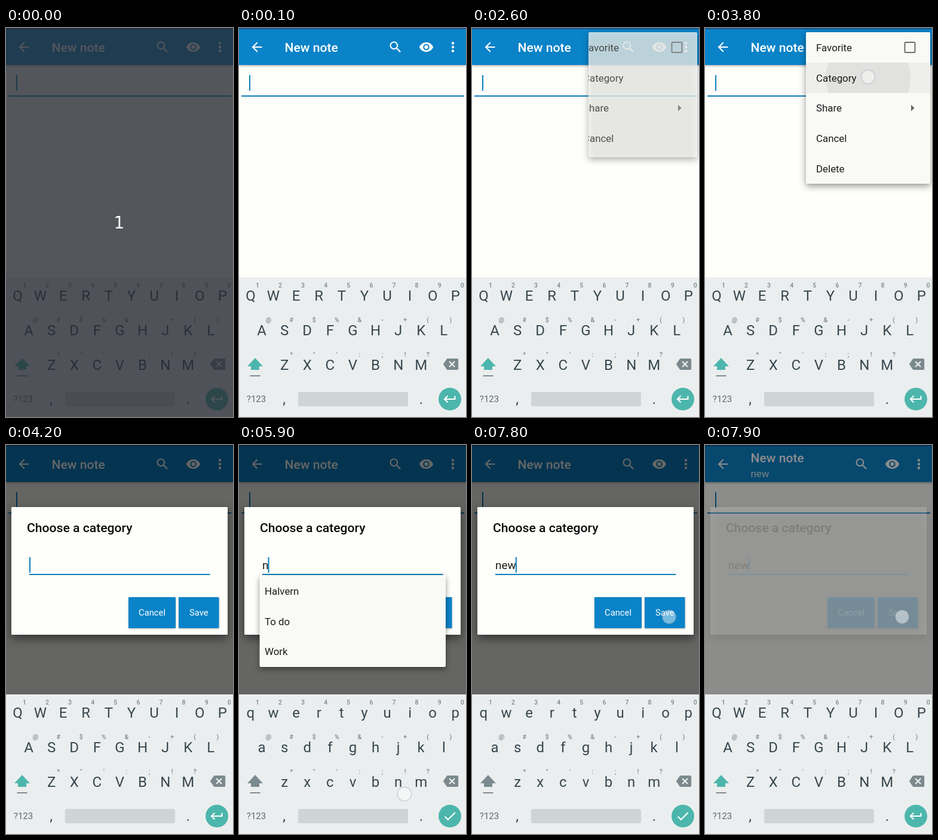
Recreate the animation shown at these times as an HTML page with a canvas. Size 380 by 652 pixels, loop 8 s.

```html
<!DOCTYPE html>
<html lang="en">
<head>
<meta charset="utf-8">
<title>New note</title>
<style>
  html, body { margin: 0; width: 100%; height: 100%; overflow: hidden; }
  canvas { display: block; width: 380px; height: 652px; }
</style>
</head>
<body>
<canvas id="stage" width="380" height="652"></canvas>
<script>
const ctx = document.getElementById('stage').getContext('2d');
const LOOP = 8000, STEP = 100, DP = 380 / 360;
const BLUE = '#0a83c8', LINE = '#0b80bb', PAPER = '#fefefb', CARD = '#f9faf6';
const KEY = '#37474f', HINT = '#7a878c', TEAL = '#4db6ac', PLATE = '#cfd5d4';

const ICONS = {
  back: 'M20 11H7.83l5.59-5.59L12 4l-8 8 8 8 1.41-1.41L7.83 13H20z',
  search: 'M15.5 14h-.79l-.28-.27C15.41 12.59 16 11.11 16 9.5 16 5.91 13.09 3 9.5 3S3 5.91 3 9.5 5.91 16 9.5 16c1.61 0 3.09-.59 4.23-1.57l.27.28v.79l5 4.99L20.49 19zm-6 0C7.01 14 5 11.99 5 9.5S7.01 5 9.5 5 14 7.01 14 9.5 11.99 14 9.5 14z',
  eye: 'M12 4.5C7 4.5 2.73 7.61 1 12c1.73 4.39 6 7.5 11 7.5s9.27-3.11 11-7.5c-1.73-4.39-6-7.5-11-7.5zM7 12a5 5 0 0 1 10 0a5 5 0 0 1-10 0zM9 12a3 3 0 0 1 6 0a3 3 0 0 1-6 0z',
  erase: 'M22 3H7c-.69 0-1.23.35-1.59.88L0 12l5.41 8.11c.36.53.9.89 1.59.89h15c1.1 0 2-.9 2-2V5c0-1.1-.9-2-2-2zM19 15.59L17.59 17 14 13.41 10.41 17 9 15.59 12.59 12 9 8.41 10.41 7 14 10.59 17.59 7 19 8.41 15.41 12z',
  enter: 'M19 7v4H5.83l3.58-3.59L8 6l-6 6 6 6 1.41-1.41L5.83 13H21V7z',
  check: 'M9 16.17L4.83 12l-1.42 1.41L9 19 21 7l-1.41-1.41z',
  shift: 'M12 2L24.3 15.2H18.6V21H5.4V15.2H-.3z'
};
for (const name in ICONS) ICONS[name] = new Path2D(ICONS[name]);

const clamp = v => Math.max(0, Math.min(1, v));
const ramp = (t, from, to) => clamp((t - from) / (to - from));
const within = (t, from, to) => t >= from && t < to;

function rect(x, y, w, h, color) {
  ctx.fillStyle = color;
  ctx.fillRect(x, y, w, h);
}

function panel(x, y, w, h, r, color, blur, drop, dark) {
  ctx.save();
  ctx.shadowColor = `rgba(0,0,0,${dark})`;
  ctx.shadowBlur = blur;
  ctx.shadowOffsetY = drop;
  ctx.fillStyle = color;
  ctx.beginPath();
  ctx.roundRect(x, y, w, h, r);
  ctx.fill();
  ctx.restore();
}

function disc(x, y, r, color) {
  ctx.fillStyle = color;
  ctx.beginPath();
  ctx.arc(x, y, r, 0, Math.PI * 2);
  ctx.fill();
}

function text(str, x, y, size, color, weight = 400, align = 'left', face = 'Roboto') {
  ctx.font = `${weight} ${size}px "${face}", sans-serif`;
  ctx.textAlign = align;
  ctx.fillStyle = color;
  ctx.fillText(str, x, y);
}

function icon(name, x, y, color) {
  ctx.save();
  ctx.translate(x, y);
  ctx.scale(DP, DP);
  ctx.translate(-12, -12);
  ctx.fillStyle = color;
  ctx.fill(ICONS[name], 'evenodd');
  ctx.restore();
}

function faded(alpha, draw) {
  if (alpha <= 0) return;
  ctx.save();
  ctx.globalAlpha = alpha;
  draw();
  ctx.restore();
}

function drawPage(t) {
  rect(0, 0, 380, 652, PAPER);
  panel(0, 0, 380, 62, 0, BLUE, 4, 1, .4);
  rect(0, 0, 380, 2, '#17548a');
  icon('back', 30, 32, '#fff');
  const saved = t >= 7900;
  text('New note', 76.5, saved ? 29 : 40, 20 * DP, '#fff', 500);
  if (saved) text('new', 76.5, 54, 16 * DP, '#dcebf4');
  icon('search', 262, 32, '#fff');
  icon('eye', 313.5, 32, '#fff');
  for (let i = -1; i < 2; i++) disc(358, 32 + i * 6.5, 2.2, '#fff');
  if (within(t, 2300, 2600)) disc(358, 32, 12 + 10 * ramp(t, 2300, 2500), 'rgba(255,255,255,.2)');
  if (!within(t, 1700, 2300)) rect(17, 79, 2, 26, LINE);
  rect(4, 113, 373, 2, LINE);
}

function drawMenu(t) {
  if (!within(t, 2500, 4100)) return;
  const open = 1 - (1 - ramp(t, 2400, 2800)) ** 2;
  const w = 208 * (.5 + .5 * open), h = 254 * (.3 + .7 * open);
  faded(open * (1 - ramp(t, 3800, 4100) ** 2), () => {
    panel(377 - w, 7, w, h, 2, CARD, 12, 4, .42);
    ctx.beginPath();
    ctx.rect(377 - w, 7, w, h);
    ctx.clip();
    if (t >= 3800) {
      rect(169, 58, 208, 51, '#eeefec');
      ctx.save();
      ctx.beginPath();
      ctx.rect(169, 58, 208, 51);
      ctx.clip();
      disc(273, 83, 71 + 90 * ramp(t, 3800, 4000), '#e1e2df');
      ctx.restore();
    }
    ['Favorite', 'Category', 'Share', 'Cancel', 'Delete'].forEach((label, i) =>
      text(label, 186, 39 + i * 48 * DP, 16 * DP, '#1c1c1c'));
    ctx.strokeStyle = '#6d6e6c';
    ctx.lineWidth = 2;
    ctx.beginPath();
    ctx.roundRect(334.5, 24, 17, 17, 1.5);
    ctx.stroke();
    ctx.fillStyle = '#666';
    ctx.beginPath();
    ctx.moveTo(345, 128.5);
    ctx.lineTo(350.5, 134);
    ctx.lineTo(345, 139.5);
    ctx.fill();
  });
}

function typed(t) {
  return t >= 6800 ? 'new' : t >= 6500 ? 'ne' : t >= 5900 ? 'n' : '';
}

function caretOn(t) {
  return !(within(t, 4600, 5100) || within(t, 5600, 5900) ||
    within(t, 6400, 6500) || within(t, 7300, 7800));
}

function drawButton(label, x, w) {
  panel(x, 255, w, 52, 1, BLUE, 3, 1, .3);
  text(label, x + w / 2, 286.3, 14 * DP, '#fff', 400, 'center');
}

function drawDialog(t) {
  const shown = t >= 7900 ? .18 : ramp(t, 3900, 4200);
  const dim = t >= 7900 ? .45 : .6 * shown;
  if (!shown) return;
  rect(0, 0, 380, 419, `rgba(0,0,0,${dim})`);
  faded(shown, () => {
    panel(9, 104, 362, 214, 1, PAPER, 16, 6, .5);
    text('Choose a category', 35, 145.5, 20 * DP, '#0a0a0a', 500);
    const value = typed(t);
    text(value, 39, 208, 18 * DP, '#1c1c1c');
    const end = value ? ctx.measureText(value).width - 1 : 0;
    rect(39, 216, 302.5, 2, LINE);
    if (caretOn(t)) rect(39 + end, 188, 2, 26, LINE);
    drawButton('Cancel', 205, 79);
    drawButton('Save', 289, 67.5);
  });
}

function drawSuggestions(t) {
  if (!within(t, 5900, 6100)) return;
  faded(t < 6000 ? 1 : .45, () => {
    panel(34.5, 218, 311.5, 154, 2, CARD, 10, 4, .42);
    ['Halvern', 'To do', 'Work'].forEach((label, i) =>
      text(label, 43, 251 + i * 48 * DP, 16 * DP, '#1c1c1c'));
  });
}

const ROWS = [
  { keys: 'QWERTYUIOP', hints: '1234567890', x: 19.4, y: 457 },
  { keys: 'ASDFGHJKL', hints: '@#$%&-+()', x: 38, y: 515 },
  { keys: 'ZXCVBNM', hints: '*"\':;!?', x: 76.2, y: 573 }
];

function drawKeyboard(t) {
  const small = within(t, 4300, 7900);
  rect(0, 418, 380, 234, '#ebeeee');
  for (const row of ROWS) {
    [...row.keys].forEach((key, i) => {
      const x = row.x + i * 38.1;
      text(small ? key.toLowerCase() : key, x, row.y, 24, KEY, 400, 'center');
      text(row.hints[i], x + 11.5, row.y - 22, 10.5, HINT, 500, 'center');
    });
  }
  icon('shift', 27, 563.5, small ? '#7b8a8f' : TEAL);
  rect(18.5, 582, 17, 2, '#7f8b8d');
  icon('erase', 354.5, 563.5, '#7b898d');
  text('?123', 29, 627, 15, '#5b696f', 400, 'center');
  text(',', 75.5, 630, 24, KEY, 400, 'center');
  text('.', 305, 630, 24, KEY, 400, 'center');
  panel(99, 610, 184, 24, 3, PLATE, 0, 0, 0);
  disc(353, 622, 19, TEAL);
  icon(small ? 'check' : 'enter', 353, 622, '#fff');
}

function drawKeyPopup(letter, x) {
  panel(x - 25.5, 352.5, 51, 119.5, 3, PLATE, 5, 2, .45);
  text(letter, x, 396, 33, KEY, 400, 'center');
  for (let i = 0; i < 3; i++) rect(x + 10.5 + i * 5, 408.5, 2.6, 2.6, '#8b979b');
}

function drawTouch(x, y) {
  disc(x, y, 11.5, 'rgba(255,255,255,.45)');
  ctx.strokeStyle = 'rgba(115,130,140,.32)';
  ctx.lineWidth = 1.4;
  ctx.beginPath();
  ctx.arc(x, y, 11.5, 0, Math.PI * 2);
  ctx.stroke();
}

const TOUCHES = [
  { from: 2300, to: 2500, x: 358, y: 33 },
  { from: 3800, to: 3900, x: 273, y: 82 },
  { from: 5900, to: 6000, x: 277, y: 585 },
  { from: 6400, to: 6500, x: 94, y: 447 },
  { from: 6700, to: 6800, x: 40, y: 445 },
  { from: 7800, to: 8000, x: 330, y: 288 }
];

function drawCountdown() {
  rect(0, 0, 380, 652, 'rgba(38,41,49,.79)');
  text('1', 189.5, 335.5, 28, '#fff', 400, 'center', 'DejaVu Sans');
}

function render(t) {
  drawPage(t);
  drawMenu(t);
  drawDialog(t);
  drawSuggestions(t);
  drawKeyboard(t);
  if (within(t, 6400, 6600)) drawKeyPopup('e', 95.8);
  if (within(t, 6700, 6900)) drawKeyPopup('w', 57.7);
  for (const p of TOUCHES) if (within(t, p.from, p.to)) drawTouch(p.x, p.y);
  if (t < 100) drawCountdown();
}

const start = performance.now();
function tick() {
  const t = (performance.now() - start) % LOOP;
  render(Math.floor(t / STEP) * STEP);
  requestAnimationFrame(tick);
}
tick();
</script>
</body>
</html>
```
